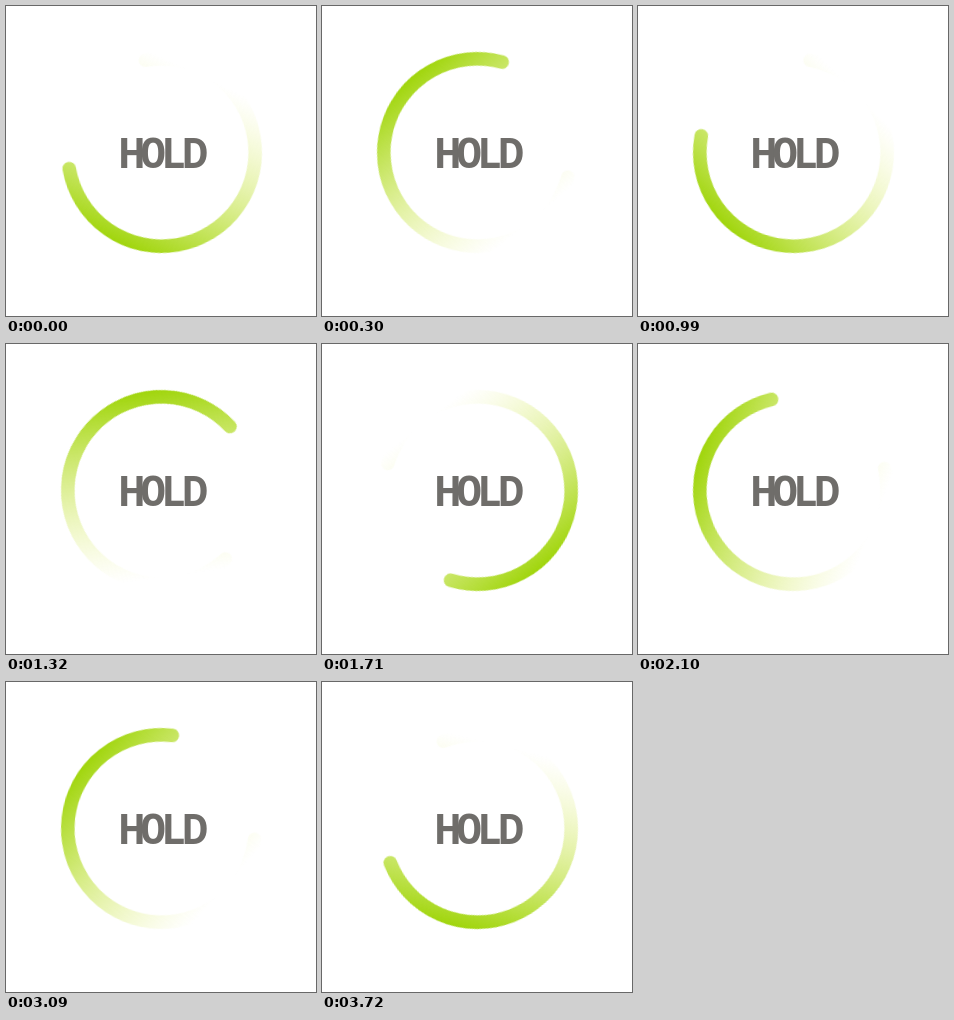
Write an HTML page that moves like this. It is 310 px wide and 310 px high and loops after 3750 ms.

```html
<!DOCTYPE html>
<html lang="en">
<head>
<meta charset="utf-8">
<title>Hold</title>
<style>
  html, body { margin: 0; width: 100%; height: 100%; overflow: hidden; background: #fff; }
  svg { display: block; width: 310px; height: 310px; }
  text {
    font: 900 42px "Noto Sans Mono", "DejaVu Sans Mono", monospace;
    letter-spacing: -4px;
    fill: #6f6d6a;
  }
</style>
</head>
<body>
<svg viewBox="0 0 310 310">
  <defs>
    <linearGradient id="fade" gradientUnits="userSpaceOnUse">
      <stop offset="0" stop-color="#a0d50c"/>
      <stop offset=".93" stop-color="#e6f078" stop-opacity="0"/>
    </linearGradient>
  </defs>
  <g transform="translate(155.5 146.5)">
    <path id="ring" fill="none" stroke="url(#fade)" stroke-width="13.6" stroke-linecap="round"/>
  </g>
  <text x="113.2" y="162">HOLD</text>
</svg>
<script>
  const LOOP = 3750, STEP = 30, TURNS = 4;
  const RADIUS = 93.7, OUTER = 100.5;
  const START = 170.1, SWEEP = 270, AXIS = 55;

  const ring = document.getElementById('ring');
  const fade = document.getElementById('fade');

  const polar = (r, deg) => {
    const a = deg * Math.PI / 180;
    return [r * Math.cos(a), r * Math.sin(a)];
  };

  // The head sits at 0 degrees and the arc trails behind it.
  ring.setAttribute('d', `M${polar(RADIUS, -SWEEP)}A${RADIUS} ${RADIUS} 0 1 1 ${polar(RADIUS, 0)}`);

  // Full colour lies a little behind the head, clear on the opposite side.
  const [x, y] = polar(OUTER, -AXIS);
  Object.entries({ x1: x, y1: y, x2: -x, y2: -y }).forEach(([k, v]) => fade.setAttribute(k, v));

  ring.animate(
    [{ transform: `rotate(${START}deg)` }, { transform: `rotate(${START + 360 * TURNS}deg)` }],
    { duration: LOOP, iterations: Infinity, easing: `steps(${LOOP / STEP})` }
  );
</script>
</body>
</html>
```
